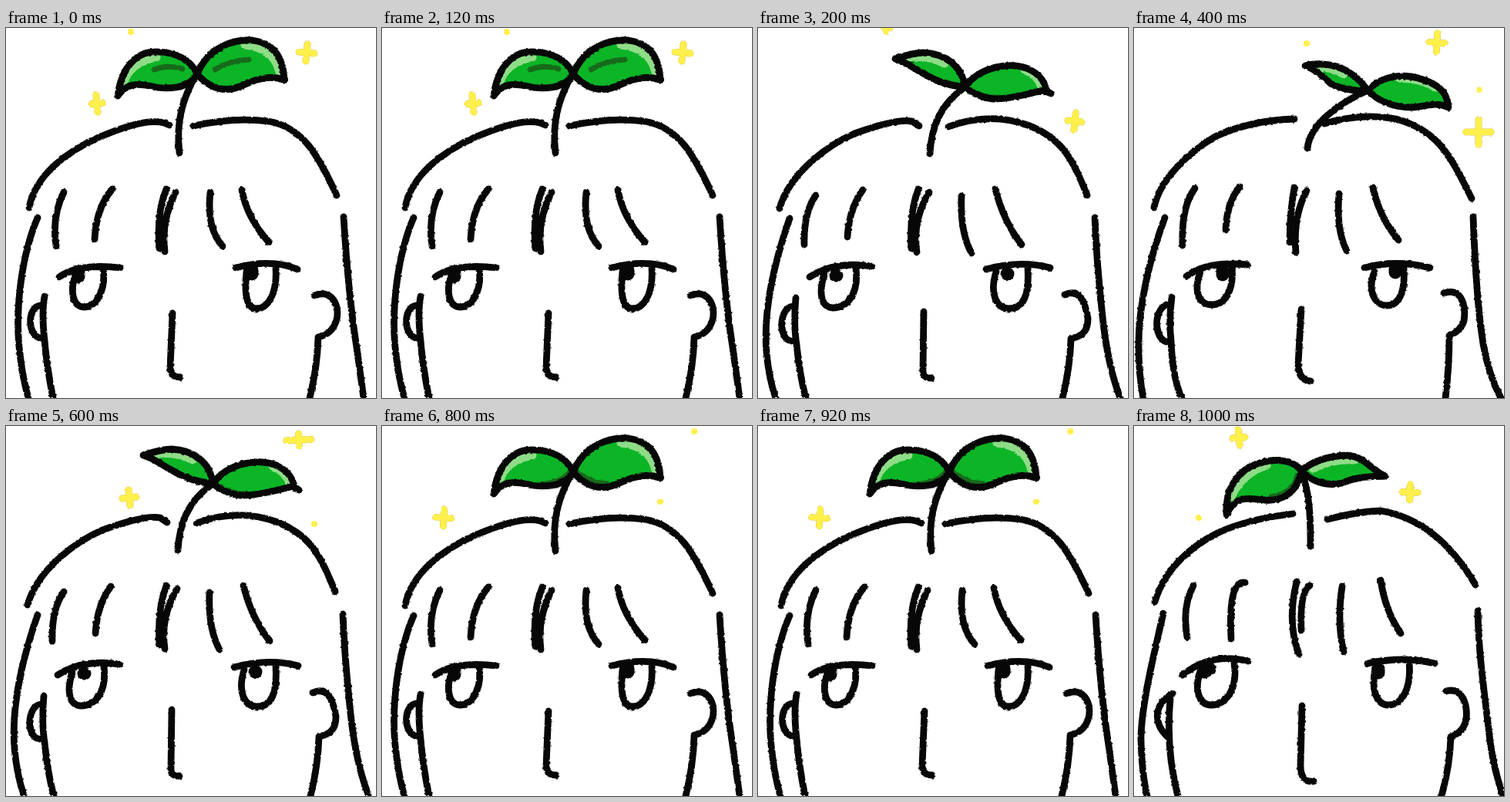
Animation of 480 by 480 pixels, one loop 1200 ms. Source, as an HTML page with a canvas:

```html
<!DOCTYPE html>
<html lang="en">
<head>
<meta charset="utf-8">
<title>Sprout</title>
<style>
  html, body { margin: 0; width: 100%; height: 100%; overflow: hidden; background: #fff; }
  canvas { display: block; width: 100vw; height: 100vh; filter: url(#rough); }
  svg { position: absolute; }
</style>
</head>
<body>
<svg width="0" height="0">
  <filter id="rough" x="0" y="0" width="1" height="1" color-interpolation-filters="sRGB">
    <feTurbulence type="fractalNoise" baseFrequency=".28" numOctaves="1" seed="4"/>
    <feDisplacementMap in="SourceGraphic" scale="3" xChannelSelector="R" yChannelSelector="G"/>
  </filter>
</svg>
<canvas width="480" height="480"></canvas>
<script>
const ctx = document.querySelector('canvas').getContext('2d');
const INK = '#070707', GREEN = '#0cb526', LIGHT = '#8fdc87', DARK = '#176a1b', YELLOW = '#fff04c';
const STEP = 200;

// Four drawn poses of the head; the leaves lean with the head.
const upright = {
  hair: `M30 233C38 190 80 160 120 142Q180 116 205 123L212 126 M243 127C275 120 310 117 340 121C385 128 405 165 429 217
    M41 246C20 295 10 370 19 430Q22 455 29 480 M438 245Q444 345 455 415L464 480
    M75 213Q59 245 65 283 M138 209Q117 233 115 274 M208 209Q195 240 199 286 M220 213Q201 250 206 290
    M265 213Q260 260 281 283 M306 210Q312 245 341 278`,
  face: `M69 323Q95 305 148 311 M90 320C83 340 86 362 101 362C117 362 130 340 126 313
    M298 311Q345 299 378 313 M312 316C309 345 312 364 325 364C342 364 352 340 350 312
    M216 370L213 440Q213 453 226 453 M44 360C28 362 26 400 47 403 M50 348Q46 370 50 405Q53 440 61 480
    M400 347C423 338 433 360 429 378Q424 397 405 401Q404 440 394 480`,
  pupils: 'M94 318v5 M319 315v4',
  stem: 'M247 60C230 90 220 120 225 162',
  leaves: ['M248 60C235 30 195 28 180 33C160 40 148 62 145 88C158 68 178 73 195 77Q235 82 248 60',
    'M248 60C262 25 295 14 320 16C350 20 360 42 361 68C345 60 325 66 308 74Q275 90 248 60'],
  shine: 'M150 76Q160 43 195 38 M310 22Q352 26 356 64',
  shade: 'M208 79Q236 76 246 62 M250 62Q270 78 290 78'
};
const tilted = {
  hair: `M28 234C42 185 95 150 125 137Q180 117 200 121L209 127 M247 128C290 112 325 117 350 126C395 143 408 170 427 217
    M41 247C19 310 7 370 11 420Q14 455 23 480 M437 246Q439 300 447 375Q454 440 470 480
    M75 217Q59 240 60 281 M136 210Q118 235 116 271 M208 209Q196 240 199 286 M222 213Q200 250 206 291
    M264 218Q262 265 277 292 M308 209Q318 250 342 281`,
  face: `M67 323Q100 302 147 309 M87 317C77 345 83 363 97 363C116 363 131 345 127 312
    M296 313Q340 301 379 311 M309 316C300 345 309 364 326 364C345 364 352 345 350 312
    M215 368L214 443Q213 455 225 454 M45 361C27 363 26 404 43 406 M49 350Q46 385 50 410Q54 450 62 480
    M398 346C418 337 425 358 428 377C428 393 421 400 406 403Q405 440 395 480`,
  pupils: 'M101 321h1 M323 319h1',
  stem: 'M268 77C235 100 225 130 223 163',
  leaves: ['M268 77C266 50 243 33 215 32C203 32 190 36 178 40C192 44 200 51 211 57Q238 74 268 77',
    'M268 77C288 50 325 44 348 52C368 60 372 72 375 82L380 85L370 81C350 85 330 92 305 92Q285 90 268 77'],
  shine: 'M190 38Q222 35 242 46 M346 54Q364 62 369 78',
  shade: 'M243 74L264 79 M272 82Q290 94 315 94'
};
const leaning = {
  hair: `M26 233C33 197 70 162 105 141Q150 120 208 118 M247 124C290 112 315 114 340 118C395 133 410 165 438 221
    M40 246C20 300 6 360 6 410Q6 450 12 480 M440 245C442 300 445 360 453 410Q460 450 476 480
    M79 208Q61 232 63 282 M137 206Q120 228 119 262 M208 207Q202 240 202 278 M224 211Q206 245 210 291
    M266 215Q262 262 276 289 M310 207Q318 245 343 275`,
  face: `M68 322Q95 302 147 307 M86 317C76 345 86 359 101 359C118 359 130 340 127 310
    M299 311Q340 300 384 311 M312 316C301 345 315 360 328 360C345 360 352 340 350 312
    M217 365L213 435Q213 457 229 458 M45 358C25 362 25 402 42 407 M49 349Q45 380 48 405Q50 455 62 480
    M402 344C425 336 431 360 428 380Q424 393 409 399Q409 440 404 480`,
  pupils: 'M115 315v5 M339 313v4',
  stem: 'M303 81C265 98 228 125 225 156',
  leaves: ['M303 81C290 62 270 48 245 47Q230 46 222 49C235 54 245 62 255 72Q275 83 303 81',
    'M303 81C325 58 355 60 375 67C400 75 407 88 408 103C390 95 380 102 360 103Q325 103 303 81'],
  shine: 'M238 50Q258 51 272 60 M345 65Q375 66 391 77',
  shade: 'M262 78L292 84 M308 90Q330 105 355 105'
};
const swung = {
  hair: `M27 228C40 185 75 155 110 138Q150 120 206 114 M251 121Q290 111 320 110C370 118 410 150 443 206
    M38 243C25 300 10 360 9 405Q10 450 17 480 M446 240C447 300 456 355 462 410Q468 450 479 480
    M77 207Q62 235 69 274 M144 203Q122 200 126 276 M211 202Q198 255 214 296 M228 207Q215 215 217 265
    M270 208Q263 255 272 293 M320 200Q326 240 346 269`,
  face: `M63 323Q100 293 148 305 M86 318C77 345 86 362 100 362C120 362 135 340 130 308
    M303 308Q350 298 390 308 M313 314C307 345 316 362 330 362C348 362 360 340 357 307
    M218 363L216 440Q216 463 233 461 M50 347C25 362 25 385 43 403 M47 354Q41 420 57 480
    M405 344C425 338 433 360 431 380Q428 397 411 403Q410 440 399 480`,
  pupils: 'M91 319L98 315 M317 315v5',
  stem: 'M217 58C227 85 229 110 229 156',
  leaves: ['M217 58C205 42 180 42 160 49C130 59 118 88 120 115C133 87 150 95 170 96C190 98 212 88 217 58',
    'M217 58C235 43 255 39 275 38C300 39 308 58 326 65C305 66 290 65 270 74Q240 81 217 58'],
  shine: 'M126 92Q140 61 172 51 M232 55Q258 42 286 44',
  shade: 'M180 95Q210 90 215 66 M222 67Q236 76 252 77'
};

// Stars are [x, y, half width, half height, tilt]; dots are [x, y, radius].
const steps = [
  { pose: upright, veins: 'M192 54Q210 47 229 53 M271 54Q290 42 315 41',
    stars: [[390, 32, 14, 15, .1], [118, 98, 11, 15, -.1]], dots: [[162, 5, 4]] },
  { pose: tilted, stars: [[411, 121, 13, 15, .1], [167, -1, 8, 9, .2]], dots: [] },
  { pose: leaning, stars: [[393, 19, 14, 16, .05], [447, 135, 20, 20, 0]], dots: [[224, 20, 4], [448, 80, 3.5]] },
  { pose: tilted, lift: 2, stars: [[380, 18, 20, 12, -.05], [160, 93, 13, 14, -.1]], dots: [[400, 127, 4]] },
  { pose: upright, stars: [[80, 119, 14, 15, .05]], dots: [[405, 7, 4], [361, 98, 4]] },
  { pose: swung, stars: [[136, 15, 12, 14, -.1], [358, 86, 14, 14, .05]], dots: [[84, 119, 4]] }
];

function line(d, width = 8.8, color = INK) {
  ctx.strokeStyle = color;
  ctx.lineWidth = width;
  ctx.stroke(new Path2D(d));
}

function drawLeaf(d, pose, veins) {
  const shape = new Path2D(d);
  ctx.save();
  ctx.clip(shape);
  ctx.fillStyle = GREEN;
  ctx.fill(shape);
  line(pose.shine, 11, LIGHT);
  if (veins) line(veins, 7, DARK);
  else line(pose.shade, 14, DARK);
  ctx.restore();
  line(d);
}

function drawStar([x, y, w, h, tilt]) {
  ctx.save();
  ctx.translate(x, y);
  ctx.rotate(tilt);
  const d = `M${4 - w} 0H${w - 4}M0 ${4 - h}V${h - 4}`;
  line(d, 9, '#d6c75a');
  line(d, 8, YELLOW);
  ctx.restore();
}

function draw({ pose, veins, lift = 0, stars, dots }) {
  ctx.clearRect(0, 0, 480, 480);
  ctx.lineCap = ctx.lineJoin = 'round';
  line(pose.face);
  line(pose.pupils, 17);
  ctx.save();
  ctx.translate(0, -lift);
  line(pose.hair);
  line(pose.stem);
  pose.leaves.forEach(d => drawLeaf(d, pose, veins));
  ctx.restore();
  stars.forEach(drawStar);
  dots.forEach(([x, y, r]) => line(`M${x} ${y}h.1`, r * 2, YELLOW));
}

let shown = -1;
function tick() {
  const i = Math.floor(performance.now() / STEP) % steps.length;
  if (i !== shown) draw(steps[shown = i]);
  requestAnimationFrame(tick);
}
tick();
</script>
</body>
</html>
```
